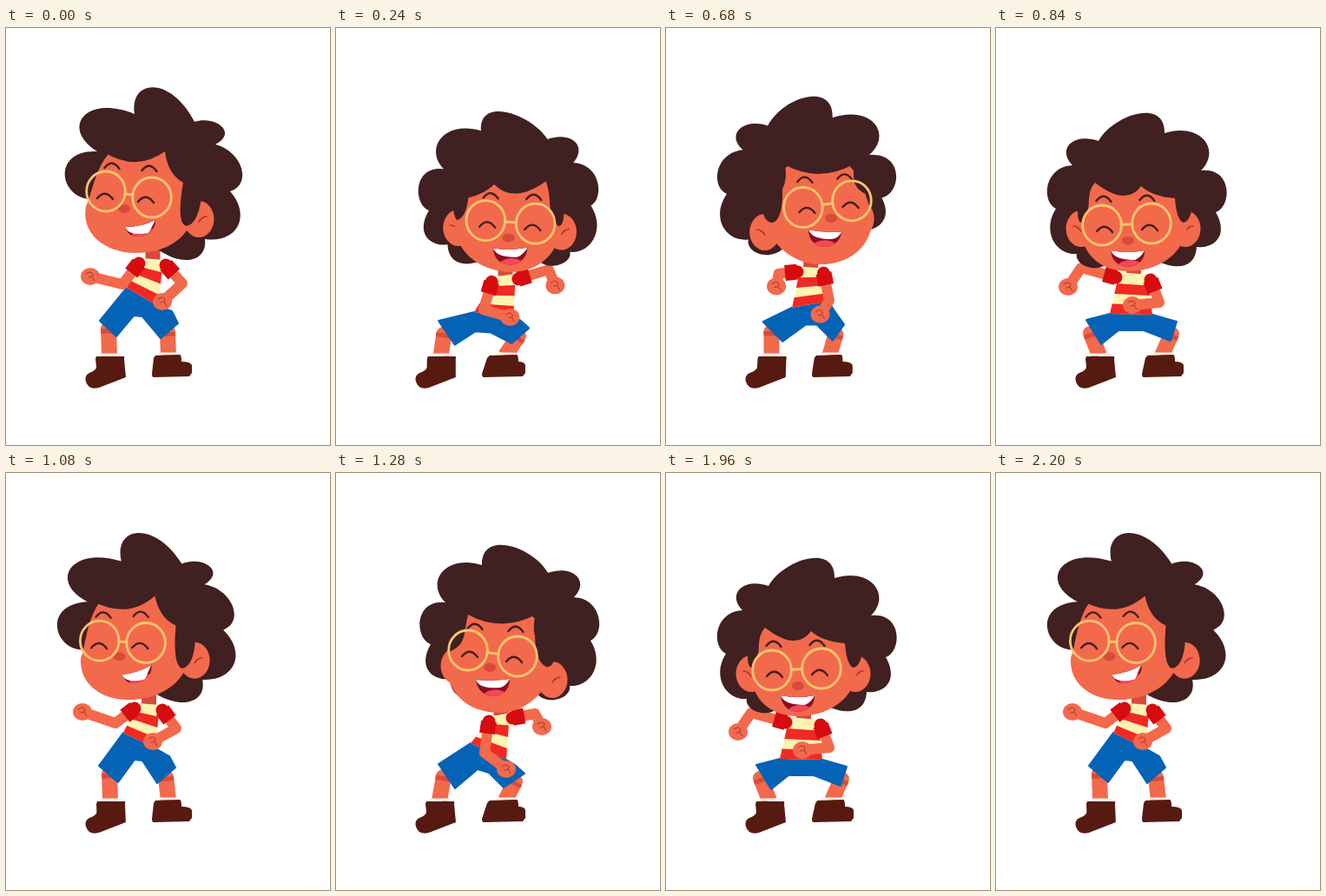
Animation, 373 px wide and 480 px high, one loop 2240 ms. Source, as an HTML page:

```html
<!DOCTYPE html>
<html lang="en">
<head>
<meta charset="utf-8">
<title>Dancing boy</title>
<style>
html, body { margin: 0; width: 100%; height: 100%; overflow: hidden; background: #fff; }
svg { display: block; width: 373px; height: 480px; }
</style>
</head>
<body>
<svg viewBox="0 0 373 480" fill="none" stroke-linecap="round" stroke-linejoin="round"></svg>
<script>
const PERIOD = 1120, STEP = 40, HOLDS = [40, 200, 600];
const PIVOT = [205, 264];
const C = {
  hair: '#402021', skin: '#f3694c', shade: '#d64b3a', line: '#a8332b', frame: '#fbc56e',
  mouth: '#8c0e22', tongue: '#f5465a', red: '#f02a22', sleeve: '#d60c10', cream: '#fff3b2',
  blue: '#0563b6', shoe: '#561a10', sock: '#fbeee8'
};

// "x,y x,y" -> [[x, y], ...]
const pts = text => text.trim().split(/\s+/).map(p => p.split(',').map(Number));
const mirror = (list, axis) => list.map(([x, y]) => [2 * axis - x, y]).reverse();

// Head views. Every list reads left to right, so mirroring is a plain reversal.
const side = {
  hair: pts(`150,245 140,250 125,240 115,225 108,215 100,205 102,197 62,200 50,140 105,142
    62,115 92,76 148,99 142,58 190,55 217,108 240,100 268,120 241,134 272,142 284,180 258,188
    282,215 268,248 229,243 232,268 205,276 175,255`),
  face: pts(`150,130 185,130 222,160 218,205 214,245 180,259 150,259 112,259 86,235 92,205
    100,195 104,130 150,130`),
  fringe: pts(`160,110 118,112 106,140 104,142 106,146 108,146 110,145 111,144 113,143 150,166
    183,142 186,168 204,178 196,224 207,228 223,226 226,185 222,112 160,110`),
  ears: pts('120,215 222,220'),
  lenses: pts('115,188 168,195'),
  eyes: pts('114,193 161,197'),
  brows: pts('122,158 165,161'),
  nose: pts('136,208'),
  mouth: pts('143,250 137,229 156,229 172,221 174,238')
};
const front = {
  hair: pts(`130,270 115,284 90,272 93,260 70,262 52,235 69,208 52,200 55,160 88,158
    70,140 88,120 118,130 135,100 195,80 194,121 235,108 260,140 236,164 272,160 272,205 253,212
    268,238 252,254 231,252 230,275 210,280 185,268`),
  face: pts(`158,150 205,150 224,190 220,228 216,262 185,280 152,280 118,280 98,258 98,230
    98,190 120,150 158,150`),
  fringe: pts(`158,130 105,135 95,200 92,224 99,224 107,215 107,196 108,184 114,178 150,206
    167,182 180,194 206,196 208,222 216,224 224,222 226,205 222,135 158,130`),
  ears: pts('98,231 218,231'),
  lenses: pts('122,227 179,225'),
  eyes: pts('125,231 177,229'),
  brows: pts('124,196 174,195'),
  nose: pts('152,245'),
  mouth: pts('134,282 132,256 152,260 171,256 172,280')
};
const quarter = {
  hair: mirror(front.hair, 181).map(([x, y]) => [x, y - 15]),
  face: pts(`185,150 225,150 252,185 249,222 246,255 212,277 188,276 150,276 124,250 128,215
    134,190 145,150 185,150`),
  fringe: pts(`190,125 148,128 138,175 130,195 130,206 146,200 148,184 150,172 152,163 190,184
    230,163 226,175 229,188 230,218 242,223 252,225 254,200 250,125 190,125`),
  ears: pts('138,222 249,238'),
  lenses: pts('152,204 209,211'),
  eyes: pts('154,208 205,214'),
  brows: pts('160,176 207,179'),
  nose: pts('177,224'),
  mouth: pts('164,264 161,238 181,240 200,237 200,263')
};

// Places a head view: optional flip, then a turn about the pivot, which lands on `at`.
function place(view, at, degrees = 0, flip = false, tuck = 0) {
  const a = degrees * Math.PI / 180, cos = Math.cos(a), sin = Math.sin(a);
  const head = {};
  for (const part in view) {
    let list = view[part];
    if (part === 'hair') list = list.map(([x, y], i) => [i >= 22 ? x - tuck : x, y]);
    if (flip) list = mirror(list, PIVOT[0]);
    head[part] = list.map(([x, y]) => {
      const dx = x - PIVOT[0], dy = y - PIVOT[1];
      return [at[0] + dx * cos - dy * sin, at[1] + dx * sin + dy * cos];
    });
  }
  return head;
}

// Arms are shoulder, elbow, hand; lean is the slant of the two shoes.
const key = (time, head, left, right, hem, shorts, knees, lean) => ({
  time,
  pose: { head, left: pts(left), right: pts(right), hem: pts(hem), shorts: pts(shorts), knees: pts(knees), lean }
});
const keys = [
  key(0, place(side, PIVOT), '153,271 134,295 97,286', '184,273 203,294 180,315', '139,299 175,320',
    '191,326 198,340 178,357 157,332 147,331 127,355 108,337', '118,346 186,350', [0, 0]),
  key(160, place(quarter, PIVOT), '176,286 171,322 196,341', '203,282 229,277 237,292', '155,311 196,330',
    '206,336 217,346 193,362 176,345 163,341 137,363 118,335', '124,349 206,355', [0, 8]),
  key(280, place(front, [153, 264], 0, true), '179,292 168,322 198,325', '211,289 248,279 256,298', '160,330 206,330',
    '214,336 222,345 203,362 178,350 160,350 138,364 119,338', '126,352 209,354', [3, 7]),
  key(480, place(side, [139, 253], 6, true, 14), '173,263 172,296 203,295', '202,262 222,275 257,284', '158,296 199,306',
    '197,320 203,346 178,348 176,323 175,325 161,352 135,338', '147,345 187,348', [10, 0]),
  key(560, place(side, [137, 263], 0, true), '164,268 153,292 178,310', '196,268 211,287 246,289', '154,301 193,306',
    '196,322 202,346 178,350 171,328 167,328 152,353 129,338', '141,346 187,349', [8, 0]),
  key(720, place(quarter, [155, 264], 0, true), '147,284 122,280 112,294', '178,286 183,320 160,338', '142,327 185,318',
    '194,328 206,340 196,362 174,345 158,345 129,363 107,338', '116,350 198,353', [1, 2]),
  key(840, place(front, PIVOT), '138,287 98,276 83,298', '178,290 188,316 157,319', '131,329 180,330',
    '194,334 208,338 201,360 170,348 141,348 121,364 104,336', '109,351 202,352', [0, 4]),
  key(1080, place(side, [204, 261], -5), '148,271 126,288 88,275', '180,273 196,294 169,309', '135,299 172,317',
    '188,326 195,339 174,357 157,331 148,330 129,356 107,337', '119,346 184,350', [1, 0])
];

function blend(a, b, c, d, mix) {
  if (typeof a === 'number') return mix(a, b, c, d);
  const out = Array.isArray(a) ? [] : {};
  for (const k in a) out[k] = blend(a[k], b[k], c[k], d[k], mix);
  return out;
}

function poseAt(time) {
  const n = keys.length;
  let i = n - 1;
  while (keys[i].time > time) i--;
  const near = [-1, 0, 1, 2].map(o => keys[(i + o + n) % n].pose);
  const [t0, t1, t2, t3] = [-1, 0, 1, 2].map(o =>
    keys[(i + o + n) % n].time + PERIOD * Math.floor((i + o) / n));
  const h = t2 - t1, u = (time - t1) / h, v = 1 - u;
  return blend(...near, (a, b, c, d) => {
    const m1 = (c - a) / (t2 - t0) * h, m2 = (d - b) / (t3 - t1) * h;
    return v * v * (1 + 2 * u) * b + u * u * (3 - 2 * u) * c + u * v * v * m1 - u * u * v * m2;
  });
}

const lerp = (a, b, t) => [a[0] + (b[0] - a[0]) * t, a[1] + (b[1] - a[1]) * t];
const add = (p, x, y) => [p[0] + x, p[1] + y];
const fill = (d, color, extra = '') => `<path d="${d}" fill="${color}" ${extra}/>`;
const stroke = (d, color, width, extra = '') =>
  `<path d="${d}" stroke="${color}" stroke-width="${width}" ${extra}/>`;
const oval = ([x, y], rx, ry, attrs) => `<ellipse cx="${x}" cy="${y}" rx="${rx}" ry="${ry}" ${attrs}/>`;
const poly = list => `M${list.join('L')}Z`;
const curve = (list, type) => `M${list[0]}${type}${list.slice(1).join(' ')}`;
const arc = ([x, y], w, color) => stroke(`M${x - w},${y + 3}Q${x},${y - 8} ${x + w},${y + 4}`, color, 2.4);

function legs({ knees, lean: [l, r] }) {
  const ankles = [[119 + l, 377], [187 + r, 377]];
  const leg = i => stroke(`M${knees[i]}L${ankles[i]}`, C.skin, 18, 'stroke-linecap="butt"') +
    oval(knees[i], 9, 8, `fill="${C.skin}"`) +
    stroke(`M${knees[i]}L${lerp(knees[i], ankles[i], .18)}`, C.shade, 18, 'stroke-linecap="butt"');
  return leg(0) + leg(1) +
    stroke(`M${109 + l},376H${131 + l}M${177 + r},375H${198 + r}`, C.sock, 3) +
    fill(`M${104 + l},378L${135 + l},378Q${137 + l},378 ${136 + l},381L${138 - l * .1},402L107,414
      Q95,417 92,407Q90,400 ${96 + l * .2},397Q${104 + l * .4},394 ${104 + l * .4},390L${103 + l},381Z`, C.shoe) +
    fill(`M${172 + r * .6},377L${200 + r},376Q${202 + r},376 ${202 + r},384Q${212 + r * .6},384 ${214 + r * .5},388
      L${214 + r * .5},397L${211 + r * .5},401L170,402Q168,402 168,398L${170 + r * .5},380Z`, C.shoe);
}

function torso({ left, right, hem, shorts }) {
  const a = add(left[0], 4, -6), b = add(right[0], -3, -6);
  const neck = lerp(a, b, .5);
  const band = (from, to, color) =>
    fill(poly([lerp(a, hem[0], from), lerp(b, hem[1], from), lerp(b, hem[1], to), lerp(a, hem[0], to)]), color);
  return stroke(`M${add(neck, 0, -14)}L${add(neck, 0, 1)}`, C.shade, 17, 'stroke-linecap="butt"') +
    fill(poly([hem[0], hem[1], ...shorts]), C.blue, `stroke="${C.blue}" stroke-width="2"`) +
    band(0, 1, C.cream) + band(.27, .52, C.red) + band(.76, 1, C.red);
}

function arm([shoulder, elbow, hand]) {
  const reach = Math.hypot(elbow[0] - shoulder[0], elbow[1] - shoulder[1]);
  const cuff = lerp(shoulder, elbow, Math.min(.8, 14 / reach));
  return stroke(`M${shoulder}L${elbow}L${hand}`, C.skin, 12) +
    oval(hand, 11, 10, `fill="${C.skin}"`) +
    stroke(`M${add(hand, -5, -3)}q5,-4 8,0q0,4 -5,4m4,-1l3,5`, C.line, 1) +
    stroke(`M${shoulder}L${lerp(shoulder, cuff, .3)}`, C.sleeve, 15) +
    stroke(`M${shoulder}L${cuff}`, C.sleeve, 18, 'stroke-linecap="butt"');
}

function headShapes(head) {
  const { hair, face, fringe, ears, lenses, eyes, brows, nose, mouth } = head;
  const [bl, l, top, r, br] = mouth;
  const mouthPath = `M${l}Q${top} ${r}C${br} ${bl} ${l}Z`;
  const gap = Math.hypot(lenses[1][0] - lenses[0][0], lenses[1][1] - lenses[0][1]);
  const inner = 22 / gap;
  const ear = (p, s) => oval(p, 17.5, 21, `fill="${C.skin}"`) +
    stroke(`M${add(p, 0, 3)}q${4 * s},-6 ${9 * s},-6`, C.line, 1.5);
  return fill(curve(hair, 'C') + 'Z', C.hair) +
    ear(ears[0], -1) + ear(ears[1], 1) +
    fill(curve(face, 'C') + 'Z', C.skin) +
    fill(curve(fringe, 'Q') + 'Z', C.hair) +
    oval(nose[0], 7, 5, `fill="${C.shade}"`) +
    `<clipPath id="lips"><path d="${mouthPath}"/></clipPath>` +
    fill(mouthPath, C.mouth) +
    `<g clip-path="url(#lips)">` +
    oval(add(lerp(bl, br, .55), 0, -5), 15, 9, `fill="${C.tongue}"`) +
    fill(`M${l}Q${top} ${r}Q${add(r, -4, 8)} ${add(top, 8, 7)}Q${add(l, 4, 11)} ${l}Z`, '#fff') + '</g>' +
    eyes.map(p => arc(p, 9, C.hair)).join('') +
    brows.map(p => arc(p, 8.5, C.hair)).join('') +
    lenses.map(p => oval(p, 22.3, 23, `stroke="${C.frame}" stroke-width="2.8"`)).join('') +
    stroke(`M${lerp(...lenses, inner)}L${lerp(...lenses, 1 - inner)}`, C.frame, 2.8);
}

const stage = document.querySelector('svg');
let shown = -1;

function render(now) {
  let time = Math.floor(now / STEP) * STEP % PERIOD;
  if (HOLDS.includes(time)) time -= STEP;
  if (time !== shown) {
    shown = time;
    const pose = poseAt(time);
    stage.innerHTML = legs(pose) + torso(pose) + arm(pose.right) + arm(pose.left) + headShapes(pose.head);
  }
}

const start = performance.now();
function tick() {
  render(performance.now() - start);
  requestAnimationFrame(tick);
}
tick();
</script>
</body>
</html>
```
